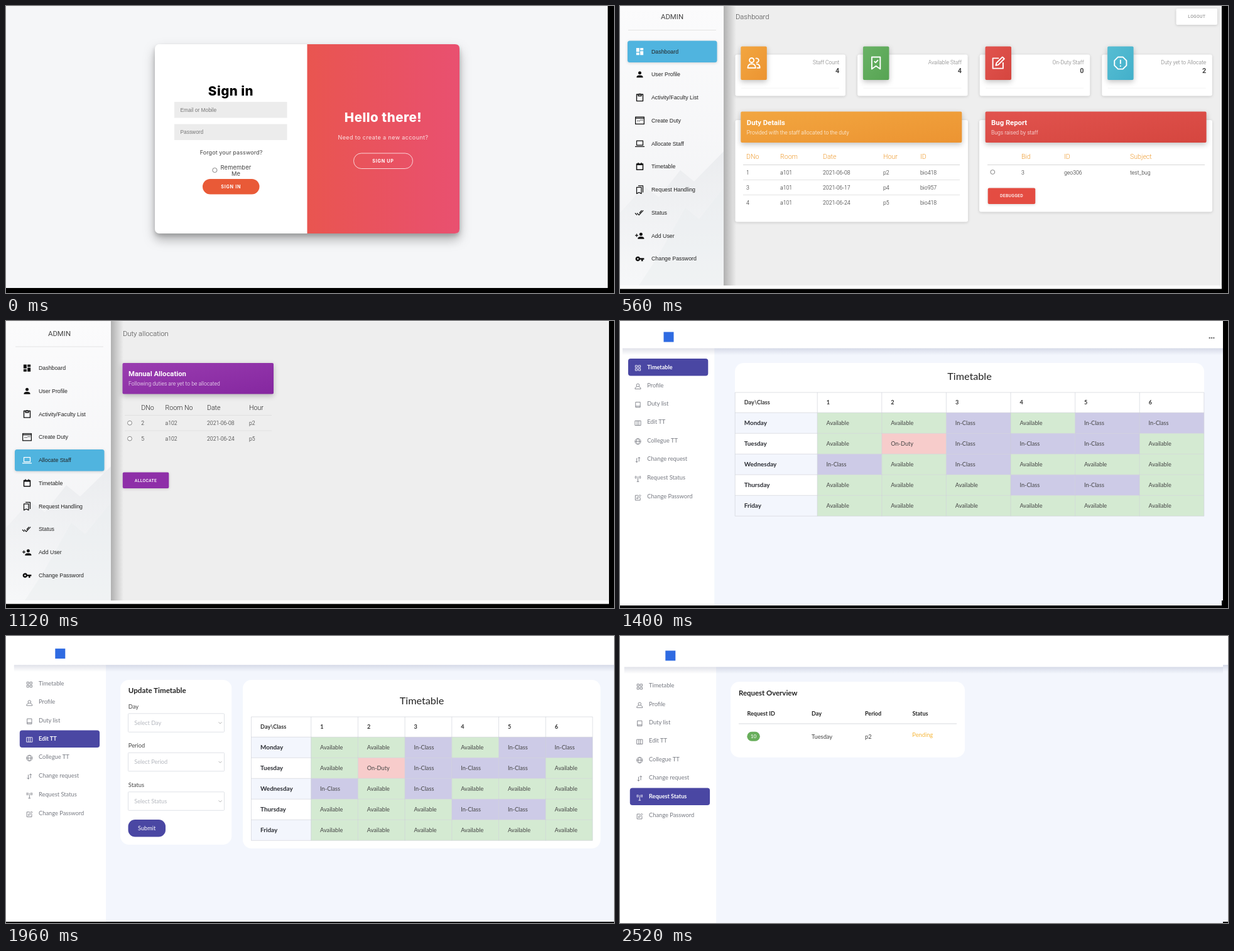
An HTML page for the animation above (2.8 s loop, 968 by 458 pixels).

```html
<!DOCTYPE html>
<html lang="en">
<head>
<meta charset="utf-8">
<title>Staff duty screens</title>
<style>
html, body { margin: 0; width: 100%; height: 100%; overflow: hidden; background: #000; }
svg { display: block; width: 968px; height: 458px; }
.head { font-family: Inter, sans-serif; font-weight: 800; font-size: 20.5px; letter-spacing: .5px; }
.body { font-family: Inter, sans-serif; font-size: 9px; letter-spacing: .1px; }
.btn { font-family: Inter, sans-serif; font-weight: 700; font-size: 7.2px; letter-spacing: .75px; }
.arial { font-family: "Liberation Sans", Arial, sans-serif; }
.light { font-family: Roboto, sans-serif; font-weight: 300; }
.reg { font-family: Roboto, sans-serif; font-weight: 400; }
.bold { font-family: Roboto, sans-serif; font-weight: 700; }
.caps { font-family: Roboto, sans-serif; font-weight: 500; font-size: 6.8px; letter-spacing: .3px; }
.lato { font-family: Lato, sans-serif; }
.latob { font-family: Lato, sans-serif; font-weight: 700; }
.mid { text-anchor: middle; }
.end { text-anchor: end; }
.card { filter: drop-shadow(0 9px 9px rgba(0,0,0,.25)) drop-shadow(0 4px 3px rgba(0,0,0,.2)); }
.soft { filter: drop-shadow(0 1px 2px rgba(0,0,0,.16)); }
.lift { filter: drop-shadow(0 3px 4px rgba(0,0,0,.24)); }
</style>
</head>
<body>
<svg id="stage" viewBox="0 0 968 458" xmlns="http://www.w3.org/2000/svg"></svg>
<script>
const STEP = 280;

const rect = (x, y, w, h, fill, r = 0, more = "") =>
  `<rect x="${x}" y="${y}" width="${w}" height="${h}" rx="${r}" fill="${fill}" ${more}/>`;
const text = (x, y, s, cls, fill, size) =>
  `<text x="${x}" y="${y}" class="${cls}" fill="${fill}"${size ? ` style="font-size:${size}px"` : ""}>${s}</text>`;
const path = (d, fill, more = "") => `<path d="${d}" fill="${fill}" ${more}/>`;
const hline = (x1, x2, y, color) => path(`M${x1} ${y}H${x2}`, "none", `stroke="${color}" stroke-width=".8"`);
const ring = (x, y, r = 3.4) => `<circle cx="${x}" cy="${y}" r="${r}" fill="#fff" stroke="#777" stroke-width=".9"/>`;
const group = (dx, dy, s) => `<g transform="translate(${dx} ${dy})">${s}</g>`;
const list = (items, fn) => items.map(fn).join("");
const chevron = (x, y, color, w) =>
  path(`M${x - 2.5} ${y - 1.2}l2.5 2.5 2.5 -2.5`, "none", `stroke="${color}" stroke-width="${w}"`);
const page = (w, h, bg) => rect(0, 0, 968, 458, "#000") + rect(0, 0, w, h, bg);

// Icons live on a 24 unit grid; width 0 means filled.
const icon = (cx, cy, size, d, color, width) =>
  `<g transform="translate(${cx - size / 2} ${cy - size / 2}) scale(${size / 24})">` +
  (width ? path(d, "none", `stroke="${color}" stroke-width="${width}" stroke-linejoin="round"`) : path(d, color)) + "</g>";

const grad = (id, a, b, dir = 'x2="1" y2="0"') =>
  `<linearGradient id="${id}" x1="0" y1="0" ${dir}><stop stop-color="${a}"/><stop offset="1" stop-color="${b}"/></linearGradient>`;
const down = 'x2="0" y2="1"', diag = 'x2="1" y2="1"';
const defs = "<defs>" +
  grad("warm", "#ea5b37", "#e95456") + grad("rose", "#e95550", "#e95070") +
  grad("orange", "#f2a640", "#ec9432", diag) + grad("green", "#69b265", "#57a453", diag) +
  grad("red", "#e1534e", "#d5463f", diag) + grad("cyan", "#56bdd3", "#43b0ca", diag) +
  grad("purple", "#9a3db0", "#8527a0", diag) +
  grad("side", "rgba(0,0,0,.26)", "rgba(0,0,0,0)") +
  grad("under", "rgba(50,60,110,.15)", "rgba(50,60,110,0)", down) +
  grad("sky", "#fbfbfc", "#f1f2f4", down) + grad("snow", "#e7e9ec", "#f8f9fa", down) + "</defs>";

// Login and registration
const ORANGE = "#e95a37";
const field = (x, y, label) => rect(x, y, 179.5, 25.5, "#ececec") + text(x + 9.5, y + 15.5, label, "arial", "#777", 8.4);
const pill = (x, y, w, label, solid) =>
  rect(x, y, w, 24.5, solid ? ORANGE : "none", 12.2, solid ? "" : 'stroke="#fff" stroke-opacity=".75"') +
  text(x + w / 2, y + 14.8, label, "btn mid", "#fff");
const half = (x, y, h, side, fill) => path(side === "left"
  ? `M${x + 242.5} ${y}h-235.5q-7 0 -7 7v${h - 14}q0 7 7 7h235.5z`
  : `M${x} ${y}h235.5q7 0 7 7v${h - 14}q0 7 -7 7h-235.5z`, fill);

function signIn() {
  return page(958, 450, "#f5f6f8") +
    rect(237, 61, 485, 302, "#fff", 7, 'class="card"') + half(479.5, 61, 302, "right", "url(#rose)") +
    text(358, 143, "Sign in", "head mid", "#000") +
    field(268, 153, "Email or Mobile") + field(268, 188.5, "Password") +
    text(358.5, 237.3, "Forgot your password?", "body mid", "#444") + ring(332.4, 262, 3.6) +
    text(366, 260.8, "Remember", "body mid", "#444", 9.4) + text(366, 271.3, "Me", "body mid", "#444", 9.4) +
    pill(313, 276, 90.5, "SIGN IN", true) +
    text(600.5, 185, "Hello there!", "head mid", "#fff") +
    `<g style="letter-spacing:.4px">${text(600.5, 212.6, "Need to create a new account?", "body mid\" style=\"letter-spacing:.4px", "#fbe3e5")}</g>` +
    pill(553.5, 235, 94, "SIGN UP", false);
}

function signUp() {
  const labels = ["Name", "Email", "Mobile Number", "", "Password", "Confirm Password"];
  return page(958, 452, "#f5f6f8") +
    rect(237, 60, 485.5, 303, "#fff", 7, 'class="card"') + half(237.5, 60, 303, "left", "url(#warm)") +
    text(359, 184.3, "Welcome Back!", "head mid", "#fff") +
    text(358.5, 211.8, "Login to access your account", "body mid\" style=\"letter-spacing:.4px", "#fbe3dc") +
    pill(313, 234, 90.5, "SIGN IN", false) +
    text(601, 99.8, "Create Account", "head mid", "#000") +
    list(labels, (s, i) => field(511.3, 110 + i * 35.5, s)) +
    text(523.3, 232, "Department", "body", "#333", 9.3) + chevron(685, 229.5, "#222", 1.4) +
    pill(554, 318.3, 94, "SIGN UP", true);
}

// Admin area
const adminMenu = [
  ["Dashboard", "M3 13h8V3H3zM3 21h8v-6H3zM13 21h8V11h-8zM13 3v6h8V3z", 0],
  ["User Profile", "M12 12a4 4 0 1 0 0-8 4 4 0 0 0 0 8zM12 14c-3 0-8 1.3-8 4v2h16v-2c0-2.7-5-4-8-4z", 0],
  ["Activity/Faculty List", "M4 4h16v17H4zM8 4v4h8V4M9 3h6", 2.2],
  ["Create Duty", "M1 3h22v18H1zM1 6h22M6 13h2M10 13h2M14 11h2M18 11h2", 2],
  ["Allocate Staff", "M4 5h16v11H4zM0 19.5h24", 2],
  ["Timetable", "M4 5h16v15H4zM4 7h16M8 2v4M16 2v4", 2.4],
  ["Request Handling", "M4 6h12v16l-6-3-6 3zM8 2h12v17", 2],
  ["Status", "M0 13l5 5M5 13l5 5L21 6M11 13l6-7", 2],
  ["Add User", "M15 12a4 4 0 1 0 0-8 4 4 0 0 0 0 8zM15 14c-3 0-8 1.3-8 4v2h16v-2c0-2.7-5-4-8-4zM3 7h2v3h3v2H5v3H3v-3H0v-2h3z", 0],
  ["Change Password", "M12.6 10A6 6 0 1 0 12.6 14H16v4h4v-4h3v-4zM7 14a2 2 0 1 1 0-4 2 2 0 0 1 0 4z", 0]
];

function admin(dx, dy, active, title, w, content) {
  const menu = list(adminMenu, ([name, d, width], i) => {
    const y = 72.5 + i * 36.77, on = i === active;
    return (on ? rect(12, y - 17, 142.5, 34.5, "#50b4df", 3.5, 'class="soft"') : "") +
      icon(31.5, y, 15, d, on ? "#fff" : "#111", width) + text(50, y + 3, name, "arial", "#222", 8.8);
  });
  return page(w, 451.5, "#fdfdfd") + rect(0, 1, w, 445, "#eee") + rect(165 + dx, 0, 20, 446, "url(#side)") +
    rect(0, 0, 165 + dx, 446, "url(#sky)") +
    path(`M0 330L38 288 62 305 96 262 118 280 ${165 + dx} 232V446H0z`, "url(#snow)", 'opacity=".75"') +
    path(`M60 400L104 322 126 340 ${165 + dx} 290V446H30z`, "#eceef0", 'opacity=".55"') +
    group(dx, dy, hline(13, 153, 38.5, "#ddd") + text(83, 21, "ADMIN", "reg mid", "#444", 11.4) + menu +
      text(184, 21, title, "light", "#444", 11.2)) + content;
}

const banner = (x, y, w, fill, title, sub) =>
  rect(x, y, w, 49.5, `url(#${fill})`, 2, 'class="lift"') +
  text(x + 9.5, y + 21, title, "bold", "#fff", 11.3) + text(x + 9.5, y + 36.3, sub, "light", "#fff", 8.6);
const cells = (xs, y, row, cls, color, size) => list(row, (s, i) => text(xs[i], y, s, cls, color, size));

function dashboard() {
  const stats = [
    ["Staff Count", 4, "orange", "M8.5 11a3.7 3.7 0 1 0 0-7.4 3.7 3.7 0 0 0 0 7.4zM2 20c0-9 13-9 13 0zM16 11a3.5 3.5 0 1 0-1-6.5M16 13.5c4 0 6 2.5 6 6.5h-5"],
    ["Available Staff", 4, "green", "M5 2h14v20l-7-5-7 5zM9 9l2.2 2.3L15.5 7"],
    ["On-Duty Staff", 0, "red", "M13 4H3v17h17V11M8 16l1-4L19 2l3 3-10 10z"],
    ["Duty yet to Allocate", 2, "cyan", "M8 2h8l6 6v8l-6 6H8l-6-6V8zM12 6.5v7M12 16v2"]
  ];
  const duties = [["1", "a101", "2021-06-08", "p2", "bio418"], ["3", "a101", "2021-06-17", "p4", "bio957"], ["4", "a101", "2021-06-24", "p5", "bio418"]];
  const cols = [201, 255, 323, 419, 478], bugCols = [639, 707, 812];
  const content = rect(885.5, 4, 65.5, 26, "#fff", 2, 'class="soft"') + text(918.3, 19.3, "LOGOUT", "caps mid", "#999") +
    list(stats, ([label, n, color, d], i) => group(i * 194.6, 0,
      rect(183.5, 77.5, 175.5, 66, "#fff", 3, 'class="soft"') +
      rect(192.3, 64.5, 41.5, 53.5, `url(#${color})`, 2, 'class="lift"') + icon(213, 91, 23, d, "#fff", 2) +
      text(349.3, 93, label, "light end", "#777", 8.5) + text(349.3, 107.3, n, "bold end", "#444", 10.8) +
      hline(193, 349, 131, "#f1f1f1"))) +
    rect(183.5, 182, 370.5, 162.5, "#fff", 3, 'class="soft"') +
    banner(192.3, 168.5, 352, "orange", "Duty Details", "Provided with the staff allocated to the duty") +
    cells(cols, 244, ["DNo", "Room", "Date", "Hour", "ID"], "light", "#ee9a2e", 10.6) + hline(196, 541, 253.5, "#ccc") +
    list(duties, (row, i) => cells(cols, 268.6 + i * 24.2, row, "light", "#222", 8.7)) +
    hline(196, 541, 277.5, "#ddd") + hline(196, 541, 301.5, "#ddd") +
    rect(572, 182, 371, 146.5, "#fff", 3, 'class="soft"') +
    banner(581.6, 168.5, 352, "red", "Bug Report", "Bugs raised by staff") +
    cells(bugCols, 244, ["Bid", "ID", "Subject"], "light", "#ee9a2e", 10.6) + hline(585, 931, 253.5, "#ccc") +
    ring(593.3, 265) + cells(bugCols, 268.6, ["3", "geo306", "test_bug"], "light", "#222", 8.7) +
    rect(585.7, 290.5, 75.5, 25.5, "#e44c42", 2, 'class="soft"') + text(623.5, 305.4, "DEBUGGED", "caps mid", "#fff");
  return admin(0, 0, 0, "Dashboard", 958, content);
}

function allocate() {
  const cols = [215.3, 253.5, 320, 387];
  const content = banner(185.5, 67, 240.5, "purple", "Manual Allocation", "Following duties are yet to be allocated") +
    cells(cols, 142, ["DNo", "Room No", "Date", "Hour"], "light", "#222", 10.6) + hline(189, 423, 150.5, "#ddd") +
    list([["2", "a102", "2021-06-08", "p2"], ["5", "a102", "2021-06-24", "p5"]], (row, i) =>
      ring(197, 162.7 + i * 25) + cells(cols, 166.4 + i * 25, row, "light", "#222", 8.7)) +
    hline(189, 423, 175, "#ddd") +
    rect(185.8, 241.5, 73.5, 25.5, "#8e2fa8", 2, 'class="soft"') + text(222.5, 256.5, "ALLOCATE", "caps mid", "#fff");
  return admin(2, 2.5, 4, "Duty allocation", 960, content);
}

// Staff area
const INDIGO = "#4a47a3";
const staffMenu = [
  ["Timetable", "M3 3h7v7H3zM14 3h7v7h-7zM3 14h7v7H3zM14 14h7v7h-7z"],
  ["Profile", "M12 13a5 5 0 1 0 0-10 5 5 0 0 0 0 10zM9 13c-4 1-7 3-7 8h20c0-5-3-7-7-8"],
  ["Duty list", "M4 3h16v18H4zM4 17h16"],
  ["Edit TT", "M2 4h20v16H2zM9 4v16M15 4v16"],
  ["Collegue TT", "M12 2a10 10 0 1 0 0 20 10 10 0 0 0 0-20zM2 12h20M12 2c-7 6-7 14 0 20M12 2c7 6 7 14 0 20"],
  ["Change request", "M8 6v15l-4-4M8 21l4-4M16 18V3l-4 4M16 3l4 4"],
  ["Request Status", "M12 10v12M8 22h8M12 5v4M8 3q-3 4 0 8M16 3q3 4 0 8M4 2q-3 5 0 10M20 2q3 5 0 10"],
  ["Change Password", "M13 4H3v17h17V11M8 16l1-4L19 2l3 3-10 10z"]
];

function staff(dx, dy, active, w, h, content) {
  const menu = list(staffMenu, ([name, d], i) => {
    const y = 73.5 + i * 29.3 + (i > 5 ? (i - 5) * .9 : 0), on = i === active;
    const color = on ? "#fff" : "#777a82";
    return (on ? rect(13, y - 13.5, 127.3, 27.5, INDIGO, 4) : "") +
      icon(28.5, y + 1.5, 11, d, color, 1.9) + text(43.2, y + 3, name, on ? "latob" : "lato", color, on ? 9.1 : 9.3);
  });
  const top = 43.5 + dy;
  return page(w, h, "#f3f6fd") + rect(0, 0, 150.3 + dx, h, "#fff") + rect(0, 0, w, top, "#fff") +
    rect(4 + dx, top, w - 4 - dx, 11, "url(#under)") +
    group(dx, dy, rect(69.5, 17.5, 16, 16, "#2f6be2") + menu) + content;
}

const states = { A: ["Available", "#d4ead2"], I: ["In-Class", "#cdcbe7"], D: ["On-Duty", "#f7cccb"] };
const week = { Monday: "AAIAII", Tuesday: "ADIIIA", Wednesday: "IAIAAA", Thursday: "AAAIIA", Friday: "AAAAAA" };

function timetable(x, y, first, col) {
  const rows = Object.entries(week), colX = i => x + first + i * col, rowY = i => y + 32.3 + i * 33;
  const right = colX(6), bottom = rowY(5);
  let out = rect(x, y, right - x, bottom - y, "#fff") + text(x + 14.6, y + 19.3, "Day\\Class", "latob", "#333", 9.1);
  let grid = `M${x} ${y}H${right}`;
  for (let c = 0; c < 6; c++) out += text(colX(c) + 14.5, y + 19.3, c + 1, "latob", "#333", 9.1);
  rows.forEach(([day, codes], r) => {
    const top = rowY(r);
    out += rect(x, top, first, 33, r % 2 ? "#fff" : "#f3f6fd") + text(x + 14.6, top + 20, day, "latob", "#2b2d33", 9.9);
    [...codes].forEach((code, c) => {
      const [label, fill] = states[code];
      out += rect(colX(c), top, col, 33, fill) + text(colX(c) + 14.4, top + 19.5, label, "lato", "#444", 9.2);
    });
    grid += `M${x} ${top}H${right}`;
  });
  grid += `M${x} ${bottom}H${right}M${x} ${y}V${bottom}`;
  for (let c = 0; c < 7; c++) grid += `M${colX(c)} ${y}V${bottom}`;
  return out + path(grid, "none", 'stroke="#c9cdd6" stroke-width=".8" stroke-opacity=".75"');
}

function timetablePage() {
  return staff(0, 0, 0, 960, 454, rect(183, 67, 747, 70, "#fff", 14) +
    text(556.5, 94, "Timetable", "lato mid", "#222", 16.2) + timetable(183.2, 114, 131, 102.6) +
    list([938.7, 942, 945.3], x => `<circle cx="${x}" cy="27" r="1.25" fill="#777"/>`) +
    rect(958, 446, 2, 8, "#000"));
}

function editPage() {
  return staff(8.8, 2.6, 3, 968, 456, rect(182, 70, 177.3, 263, "#fff", 14) + rect(377, 70, 569.5, 269, "#fff", 14) +
    text(194.8, 91, "Update Timetable", "latob", "#222", 11.6) +
    list(["Day", "Period", "Status"], (s, i) => group(0, i * 62.5,
      text(194.8, 115.6, s, "lato", "#444", 9.3) +
      rect(194.5, 123.8, 153, 29.5, "#fff", 1, 'stroke="#dcdfe5" stroke-width=".9"') +
      text(204.3, 141.6, "Select " + s, "lato", "#b5b8bf", 9.2) + chevron(341, 138.6, "#aaa", .9))) +
    rect(194.5, 293, 59.5, 27.5, INDIGO, 11) + text(224.2, 309.8, "Submit", "lato mid", "#fff", 9.2) +
    text(662, 108.5, "Timetable", "lato mid", "#222", 16.2) + timetable(390.5, 129, 95.2, 74.7));
}

function statusPage() {
  const cols = [202.5, 305, 390, 465.5];
  return staff(2.8, 5.9, 6, 960, 458, rect(176, 73, 373, 120.7, "#fff", 14) +
    text(189, 95, "Request Overview", "latob", "#222", 11.4) +
    cells(cols, 127.2, ["Request ID", "Day", "Period", "Status"], "latob", "#222", 9) + hline(189, 536, 140, "#cdd0d6") +
    rect(202.3, 152.8, 20.5, 15, "#68ae5b", 7.5) + text(212.5, 163.4, "10", "lato mid", "#fff", 8.2) +
    text(305, 163.6, "Tuesday", "lato", "#444", 9.3) + text(390, 163.6, "p2", "lato", "#444", 9.3) +
    text(465.3, 161.2, "Pending", "lato", "#f6b73c", 9.3) +
    rect(960, 0, 8, 46, "#fff") + rect(960, 46, 8, 410, "#f3f6fd") + rect(960, 46, 8, 11, "url(#under)"));
}

const scenes = [
  signIn(), signUp(), dashboard(),
  admin(1, 1, 3, "Create Duty", 959, ""),
  allocate(), timetablePage(),
  staff(3, 2, 2, 962, 455, ""),
  editPage(),
  staff(8.8, 2.6, 5, 968, 456, ""),
  statusPage()
];

const stage = document.getElementById("stage");
stage.innerHTML = defs + list(scenes, s => `<g visibility="hidden">${s}</g>`);
const layers = [...stage.children].slice(1);
const start = performance.now();

function draw(time) {
  const current = Math.floor(time / STEP) % layers.length;
  layers.forEach((layer, i) => layer.setAttribute("visibility", i === current ? "visible" : "hidden"));
}

function tick() {
  draw(performance.now() - start);
  requestAnimationFrame(tick);
}
tick();
</script>
</body>
</html>
```
